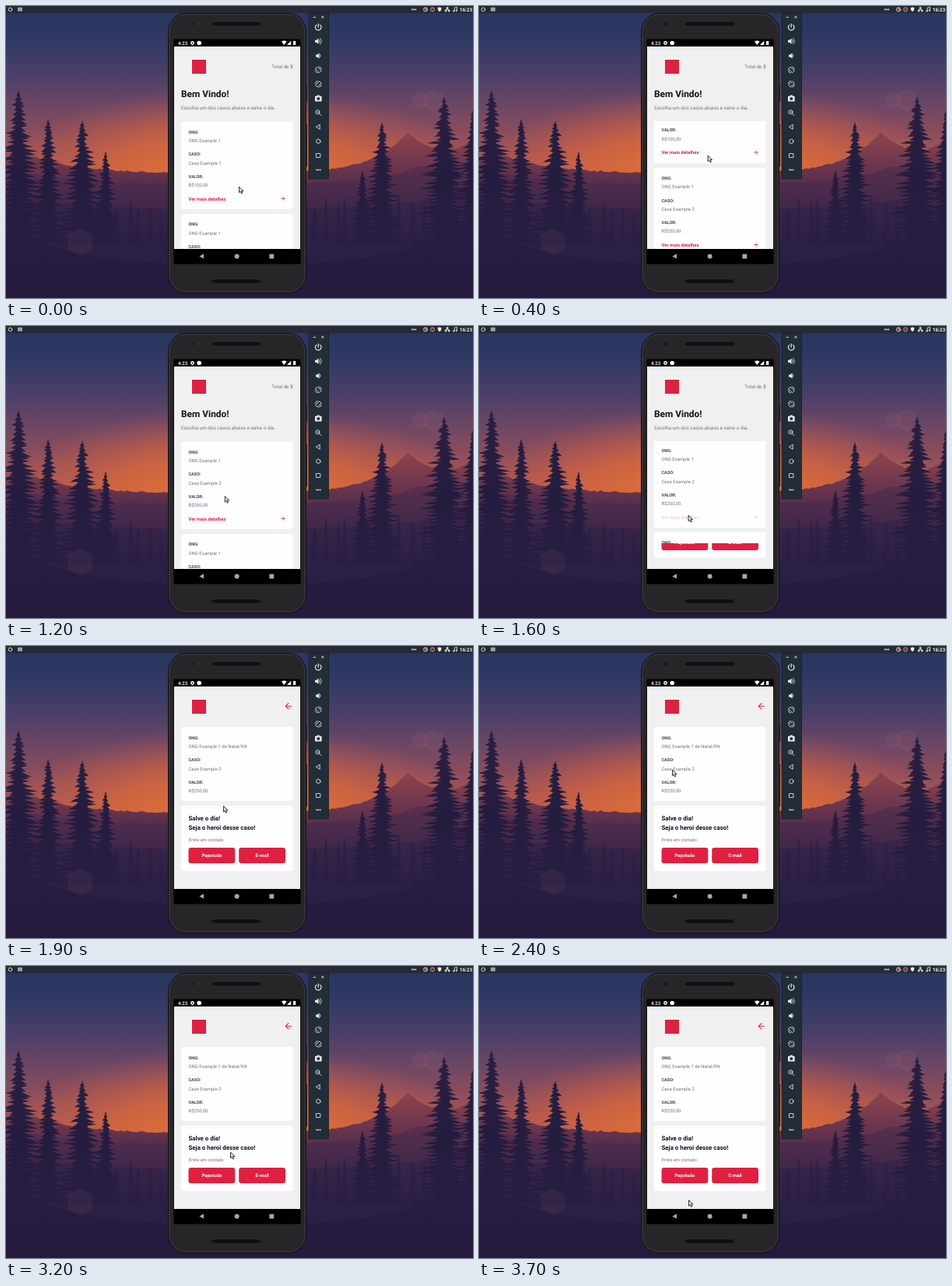
Animation of 600x375 px, one loop 3800 ms. Source, as an HTML page with a canvas:

```html
<!DOCTYPE html>
<html lang="pt">
<head>
<meta charset="utf-8">
<title>Casos</title>
<style>
html, body { margin: 0; width: 100%; height: 100%; overflow: hidden; background: #231a3e; }
canvas, svg { position: absolute; left: 0; top: 0; width: 600px; height: 375px; display: block; }
text { font-family: Roboto, Arial, sans-serif; font-size: 5.95px; fill: #737380; text-rendering: geometricPrecision; }
.label { font-size: 5.5px; font-weight: 700; fill: #41414d; }
.title { font-size: 11.9px; font-weight: 700; fill: #13131a; }
.hero { font-size: 7.9px; font-weight: 700; fill: #13131a; }
.lead { font-size: 6.3px; }
.strong { font-weight: 700; }
.red { font-weight: 700; fill: #e02041; }
.btn { font-weight: 700; fill: #fff; text-anchor: middle; }
.card { fill: #fefdff; }
.line, .redline { fill: none; stroke: #e9edf0; stroke-width: .85; stroke-linecap: round; stroke-linejoin: round; }
.redline { stroke: #e02041; }
.light { fill: #e9edf0; }
.nav { fill: #a9a9a9; }
</style>
</head>
<body>
<canvas id="bg" width="600" height="375"></canvas>
<svg viewBox="0 0 600 375">
  <defs>
    <clipPath id="screenClip"><rect x="216" y="52" width="162" height="260"/></clipPath>
    <clipPath id="listClip"><rect x="216" y="148" width="162" height="164"/></clipPath>
    <clipPath id="lowClip"><rect x="216" y="279" width="162" height="33"/></clipPath>
    <g id="dots" class="light"><circle cx="-2.3" r=".9"/><circle r=".9"/><circle cx="2.3" r=".9"/></g>
    <g id="turn" class="line"><rect x="-1.8" y="-3.6" width="3.6" height="7.2" rx=".5" transform="rotate(-45)"/>
      <path d="M-4 .8q.4 2.900 3.200 3.200M4-.8q-.4-2.900-3.200-3.200"/></g>
    <g id="horn" class="light"><path d="M-4-1.500h2l2.400-2.200v7.400L-2 1.500h-2z"/></g>
    <rect id="slot" x="264" width="64" height="6" rx="3" fill="#111012" stroke="#38353a" stroke-width=".6"/>
  </defs>

  <!-- desktop bar -->
  <rect width="600" height="9" fill="#252a35"/>
  <circle class="line" cx="5.500" cy="4.500" r="2.300"/>
  <rect x="15" y="1.800" width="6" height="5" rx=".6" fill="#9da1a7"/>
  <use href="#dots" x="524" y="4.500"/>
  <circle class="line" cx="539" cy="4.500" r="2.600"/>
  <path class="line" d="M539 3v1.800h1.300M567 3.400v1.200m-2 .8v-.7h4.200v.7M576.200 6.200v-4l3.200-.6v4"/>
  <circle cx="548" cy="4.500" r="2.600" fill="#70343c" stroke="#d79a98" stroke-width=".8"/>
  <path class="light" d="M554.600 2.200l2.400-.8 2.400.8q0 3.800-2.400 5-2.400-1.200-2.400-5zM565.700 1.500h2.600v2h-2.600zM563.800 5.300h2.400v2h-2.400zM568 5.300h2.400v2H568z"/>
  <circle class="light" cx="575.400" cy="6.400" r="1.100"/><circle class="light" cx="578.800" cy="5.800" r="1.100"/>
  <text x="599" y="6.900" text-anchor="end" style="font:700 6.300px 'Open Sans',sans-serif;fill:#f2f2f2">16:23</text>

  <!-- phone -->
  <path d="M384 102h3v21h-3zM384 152h3v54h-3z" fill="#2c292d"/>
  <rect x="208.500" y="9.500" width="177" height="359" rx="23" fill="#272528" stroke="#121114"/>
  <rect x="210" y="11" width="174" height="356" rx="21.500" fill="none" stroke="#434044" stroke-width=".9"/>
  <use href="#slot" y="20"/><use href="#slot" y="350.500"/>
  <circle cx="239.500" cy="23" r="1.800" fill="#141316"/>
  <rect x="215.500" y="42.500" width="163" height="289"/>
  <text x="221" y="49.800" style="font-size:6.200px;font-weight:500;fill:#fff">4:23</text>
  <circle cx="239.500" cy="47.500" r="1.700" fill="none" stroke="#fff" stroke-width="1.500"/>
  <circle cx="248.200" cy="47.500" r="2.800" fill="#fff"/>
  <path d="M354 45.800q3.300-2.400 6.600 0l-3.300 4.100zM366.200 44.700v5.200H361zM369 45h3.200v5H369z" fill="#fff"/>

  <g clip-path="url(#screenClip)">
    <rect x="216" y="52" width="162" height="260" fill="#f0f0f0"/>
    <g id="home">
      <text x="368.500" y="79.700" text-anchor="end" style="font-size:6.200px">Total de <tspan class="strong">3</tspan></text>
      <text class="title" x="225" y="117">Bem Vindo!</text>
      <text class="lead" x="225" y="133.400">Escolha um dos casos abaixo e salve o dia.</text>
      <g clip-path="url(#listClip)"><g id="list"></g></g>
    </g>
    <g id="clipper">
      <g id="detail">
        <rect x="216" y="92" width="162" height="240" fill="#f0f0f0"/>
        <rect class="card" x="225" y="104" width="143.500" height="95" rx="3"/>
        <g id="facts"></g>
        <rect class="card" x="225" y="205" width="143.500" height="84" rx="3"/>
        <text class="hero" x="234.500" y="223.600">Salve o dia!</text>
        <text class="hero" x="234.500" y="235.500">Seja o heroi desse caso!</text>
        <text x="234.500" y="251">Entre em contato:</text>
        <rect x="234.500" y="259" width="59.800" height="20" rx="3" fill="#e02041"/>
        <rect x="299.200" y="259" width="59.800" height="20" rx="3" fill="#e02041"/>
        <text class="btn" x="264.400" y="271.200">Papotudo</text>
        <text class="btn" x="329" y="271.200">E-mail</text>
      </g>
    </g>
    <path id="back" class="redline" style="stroke-width:1.100" d="M366.600 77.300h-7.200m3.500-3.600l-3.600 3.600 3.600 3.600"/>
    <rect x="239" y="69" width="18" height="18" fill="#dc2142"/>
  </g>

  <path class="nav" d="M254 318.200v6.400l-5.600-3.200z"/>
  <circle class="nav" cx="296.600" cy="321.400" r="3"/>
  <rect class="nav" x="338.400" y="318.600" width="5.800" height="5.800"/>

  <!-- emulator tools -->
  <rect x="389" y="9" width="25.500" height="213" fill="#222d37" stroke="#151c24" stroke-width=".7"/>
  <g class="line">
    <path d="M395 14.400h2.600M405.600 13l2.400 2.400m0-2.400l-2.400 2.400"/>
    <path style="stroke-width:1.200" d="M401.200 23v4.200M398.800 24.400a3.800 3.800 0 1 0 4.800 0"/>
    <path d="M402.600 43.600q1.200 1.700 0 3.400M403.600 41.500q3.600 4 0 7.600M403.400 62.200q1.400 1.700 0 3.400"/>
    <circle cx="400.400" cy="136.200" r="2.600"/><path d="M402.500 138.300l2.300 2.300M399.300 136.200h2.200"/>
    <path d="M403.200 152.700v5.600l-4.500-2.800z"/>
    <circle cx="401.300" cy="173.800" r="2.700"/>
    <path d="M398.800 189.500h5v5h-5z"/>
  </g>
  <use href="#horn" x="401" y="45.300"/><use href="#horn" x="402" y="63.900"/>
  <use href="#turn" x="401.300" y="82"/>
  <use href="#turn" transform="translate(401.300 100.300) scale(-1 1)"/>
  <path class="light" fill-rule="evenodd" d="M397 115.800h2.200l.8-1.200h2.600l.8 1.200h2.200v6.600H397zM401.300 117a2 2 0 1 0 .01 0z"/>
  <use href="#dots" x="401.300" y="210.400"/>

  <path id="cursor" d="M0 0v7.600l1.700-1.500 1.200 2.700 1.500-.6-1.200-2.700h2.300z" fill="#ddd" stroke="#1c1c1c" stroke-width=".85" stroke-linejoin="round"/>
</svg>
<script>
const $ = id => document.getElementById(id);

// --- wallpaper ---
const ctx = $('bg').getContext('2d');
let seed = 11;
const rnd = () => (seed = seed * 16807 % 2147483647) / 2147483647;

function vertical(y0, y1, ...colors) {
  const g = ctx.createLinearGradient(0, y0, 0, y1);
  colors.forEach((c, i) => g.addColorStop(i / (colors.length - 1), c));
  return g;
}

function sky() {
  ctx.fillStyle = vertical(0, 220, '#26355f', '#303964', '#4b3f69', '#704763', '#985057', '#b4594b');
  ctx.fillRect(0, 0, 600, 375);
  const glow = ctx.createRadialGradient(0, 0, 20, 0, 0, 250);
  glow.addColorStop(0, 'rgba(238,118,48,.9)');
  glow.addColorStop(.5, 'rgba(230,110,55,.6)');
  glow.addColorStop(1, 'rgba(220,100,70,0)');
  ctx.save();
  ctx.translate(300, 215);
  ctx.scale(1.2, .45);
  ctx.fillStyle = glow;
  ctx.fillRect(-300, -300, 600, 600);
  ctx.restore();
}

// each peak is [x, height, spread]
function ridge(base, peaks, fill) {
  ctx.beginPath();
  ctx.moveTo(0, 375);
  for (let x = 0; x <= 600; x += 4) {
    const rise = peaks.reduce((sum, [c, h, w]) => sum + h * Math.exp(-Math.abs(x - c) / w), 0);
    ctx.lineTo(x, base - rise + rnd() * 2);
  }
  ctx.lineTo(600, 375);
  ctx.fillStyle = fill;
  ctx.fill();
}

function tree(x, top, base, width) {
  ctx.fillRect(x - .7, top - 2, 1.4, base - top);
  for (const side of [-1, 1]) {
    ctx.beginPath();
    ctx.moveTo(x, top);
    for (let y = top + 3; y < base; y += 3 + rnd() * 4) {
      const reach = 1 + width / 2 * ((y - top) / (base - top)) ** .7 * (.5 + rnd() * .6);
      ctx.lineTo(x + side * reach * .6, y - 1);
      ctx.lineTo(x + side * reach, y + rnd() * 3);
      ctx.lineTo(x + side * reach * .35, y + 2.5);
    }
    ctx.lineTo(x, base);
    ctx.fill();
  }
}

function hexagon(x, y, r) {
  ctx.beginPath();
  for (let a = .5; a < 6.7; a += Math.PI / 3) ctx.lineTo(x + r * Math.cos(a), y + r * Math.sin(a));
  ctx.fillStyle = 'rgba(255,150,140,.06)';
  ctx.fill();
}

sky();
ridge(214, [[20, 28, 60], [516, 50, 45], [605, 42, 35]], vertical(165, 245, '#8b434b', '#6c364d', '#4a294c'));
ridge(228, [[30, 15, 70], [530, 12, 40], [600, 30, 70]], vertical(195, 270, '#5d314d', '#3b264a'));
ridge(262, [[0, 22, 90], [600, 28, 90]], vertical(235, 375, '#3c2649', '#2c2045', '#271d42'));
ctx.fillStyle = 'rgba(40,28,68,.35)';
for (let x = 0; x < 600; x += 14) tree(x + rnd() * 8, 245 + rnd() * 25, 305, 16);
ridge(338, [[0, 55, 100], [600, 70, 90]], vertical(265, 375, '#2a1f45', '#251c41', '#231a3d'));
ctx.fillStyle = vertical(110, 320, '#2a2040', '#241c3e', '#271d43');
[[16, 111, 84], [54, 148, 54], [98, 150, 72], [128, 190, 44], [483, 152, 62], [458, 214, 36], [563, 119, 88], [600, 136, 60]]
  .forEach(([x, top, width]) => tree(x, top, 305, width));
hexagon(532, 121, 12);
hexagon(549, 121, 15);
hexagon(95, 303, 18);

// --- app content ---
const pitch = 118.5;
const facts = (values, top) => ['ONG:', 'CASO:', 'VALOR:'].map((label, i) => `
  <text class="label" x="234.5" y="${top + i * 28.4}">${label}</text>
  <text x="234.5" y="${top + 11.2 + i * 28.4}">${values[i]}</text>`).join('');

$('list').innerHTML = [100, 250, 500].map((price, i) => `<g transform="translate(0 ${148.5 + i * pitch})">
  <rect class="card" x="225" width="143.5" height="112.5" rx="3"/>
  ${facts(['ONG Example 1', `Case Example ${i + 1}`, `R$${price},00`], 15.4)}
  <g class="more"><text class="red" x="234.5" y="101">Ver mais detalhes</text>
  <path class="redline" d="M353.5 98.8h4.3m-2-2l2 2-2 2"/></g></g>`).join('');
$('facts').innerHTML = facts(['ONG Example 1 de Natal/RN', 'Case Example 2', 'R$250,00'], 119.9);
const more = document.querySelectorAll('.more')[1];

// --- motion ---
const loop = 3800, step = 100, opens = 1600;
const path = [[0, 299.5, 232], [400, 294, 192], [800, 293.5, 194], [opens, 269, 243],
  [1900, 279.5, 205.5], [2400, 248.5, 159], [3200, 288.5, 239], [3700, 269.5, 300.5]];
const smooth = k => k * k * (3 - 2 * k);

function pointer(t) {
  const i = Math.max(1, path.findIndex(p => p[0] >= t));
  const [t0, x0, y0] = path[i - 1], [t1, x1, y1] = path[i];
  const k = smooth((t - t0) / (t1 - t0));
  return [x0 + (x1 - x0) * k, y0 + (y1 - y0) * k];
}
const move = (id, x, y) => $(id).setAttribute('transform', `translate(${x} ${y})`);
const show = (id, on) => $(id).setAttribute('visibility', on ? 'visible' : 'hidden');

function draw(t) {
  const age = t - opens, entering = age >= 0 && age < step;
  move('list', 0, -pitch * smooth(Math.min(1, t / 800)) - (age >= 0 ? 2 : 0));
  move('cursor', ...pointer(t));
  more.setAttribute('opacity', age < 0 ? 1 : .2);
  show('home', age < step);
  show('detail', age >= 0);
  show('back', age >= step);
  $('clipper').setAttribute('clip-path', entering ? 'url(#lowClip)' : 'none');
  move('detail', 0, 9 * Math.max(0, 1 - age / (2 * step)) ** 2);
}

const start = performance.now();
function tick() {
  const t = (performance.now() - start) % loop;
  draw(Math.floor(t / step) * step);
  requestAnimationFrame(tick);
}
tick();
</script>
</body>
</html>
```
